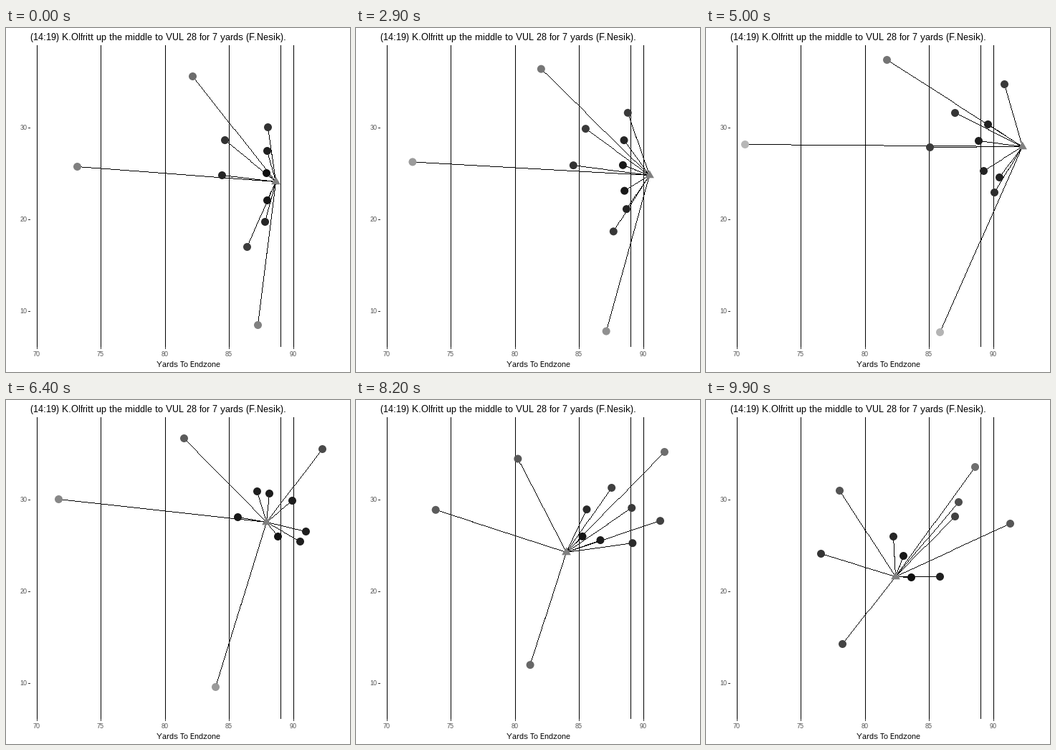
Write a matplotlib script that moves like this. It is 480 by 480 pixels and loops after 10 s.

```python
import numpy as np
import matplotlib.pyplot as plt
from matplotlib.animation import FuncAnimation
from matplotlib.patches import Polygon

SIZE, DPI, FRAMES = 480, 100, 100
PX = 72 / DPI                      # one pixel in points
YARD = np.array([17.92, 12.8])     # pixels per yard along x and y

plt.rcParams["font.family"] = "Liberation Sans"
plt.rcParams["text.hinting"] = "default"
plt.rcParams["text.hinting_factor"] = 1

# Each defender: the set, the chase, the turn back and the finish
KEYS = [13, 50, 64, 99]
DEFENCE = [
    [(260, 67), (252, 44), (248, 53), (186, 126)],
    [(99, 193), (54, 162), (73, 138), (160, 214)],
    [(351, 414), (326, 424), (292, 400), (190, 340)],
    [(305, 156), (347, 118), (350, 127), (261, 190)],
    [(301, 205), (312, 166), (323, 163), (286, 247)],
    [(365, 138), (416, 78), (441, 68), (375, 93)],
    [(364, 171), (393, 134), (399, 140), (347, 162)],
    [(363, 202), (380, 157), (367, 130), (352, 142)],
    [(364, 240), (387, 199), (379, 190), (275, 217)],
    [(361, 270), (409, 208), (418, 183), (424, 172)],
    [(336, 305), (402, 229), (410, 197), (326, 246)],
]
RUN_KEYS = [13, 29, 43, 50, 64, 82, 99]
RUNNER = [(376, 214), (409, 205), (454, 178), (441, 165), (363, 170), (293, 212), (264, 246)]


def track(points, keys):
    """Stand still until the first key, then run smoothly through the points."""
    k, p = np.array(keys, float), np.array(points) + 0.5
    m = np.gradient(p, k, axis=0, edge_order=2)
    m[0] = 0
    t = np.maximum(np.arange(FRAMES), k[0])
    i = np.clip(np.searchsorted(k, t, side="right") - 1, 0, len(k) - 2)
    h = (k[i + 1] - k[i])[:, None]
    u = (t - k[i])[:, None] / h
    return ((1 + 2 * u) * (1 - u) ** 2 * p[i] + u * (1 - u) ** 2 * h * m[i]
            + u * u * (3 - 2 * u) * p[i + 1] + u * u * (u - 1) * h * m[i + 1])


def shade(yards):
    """Grey whose perceived lightness grows with distance."""
    light = np.clip(3.45 * yards, 0, 100)
    lum = np.where(light > 8, ((light + 16) / 116) ** 3, light / 903.3)
    grey = np.where(lum > 0.0031308, 1.055 * lum ** (1 / 2.4) - 0.055, 12.92 * lum)
    return np.repeat(grey[:, None], 3, axis=1)


def hairline(ink, a, b):
    """Mark a hard one-pixel line in the alpha channel."""
    steps = int(np.abs(b - a).max()) + 1
    x, y = np.linspace(a, b, steps + 1).astype(int).T
    ink[y, x, 3] = 255


runner = track(RUNNER, RUN_KEYS)
defence = np.stack([track(p, KEYS) for p in DEFENCE], axis=1)

fig = plt.figure(figsize=(SIZE / DPI, SIZE / DPI), dpi=DPI, facecolor="white")
ax = fig.add_axes([0, 0, 1, 1])


def rule(xs, ys, color="black"):
    ax.plot(xs, ys, color=color, lw=PX, snap=False, solid_capstyle="butt", zorder=1)


def label(x, y, text, size, color="black", ha="center"):
    ax.text(x, y, text, fontsize=size * PX, color=color, ha=ha, va="baseline")


for yards in range(70, 91, 5):
    x = int(43 + (yards - 70) * YARD[0]) + 0.5
    rule([x, x], [24, 445])
    rule([x, x], [445, 448], "#333333")
    label(x - 0.5, 458, str(yards), 9, "#4d4d4d")
rule([383.5, 383.5], [24, 445])
for yards in (10, 20, 30):
    y = 523.5 - yards * YARD[1]
    rule([31, 34], [y, y], "#333333")
    label(29.5, y + 2.5, str(yards), 9, "#4d4d4d", "right")
label(254, 473, "Yards To Endzone", 11)
label(34, 17, "(14:19) K.Olfritt up the middle to VUL 28 for 7 yards (F.Nesik).",
      13, ha="left")

blank = np.zeros((SIZE, SIZE, 4), np.uint8)
links = ax.imshow(blank, extent=(0, SIZE, SIZE, 0), interpolation="nearest",
                  aspect="auto", zorder=2)
dots = ax.scatter(*defence[0].T, s=(11 * PX) ** 2, linewidths=0, snap=False, zorder=3)
corners = np.array([(0, -7.3), (6.4, 3.8), (-6.4, 3.8)])
marker = ax.add_patch(Polygon(corners, fc="#7f7f7f", lw=0, snap=False, zorder=4))
ax.set(xlim=(0, SIZE), ylim=(SIZE, 0))
ax.axis("off")


def draw(frame):
    spots, carrier = defence[frame], runner[frame]
    ink = blank.copy()
    for spot in spots:
        hairline(ink, spot, carrier)
    links.set_data(ink)
    dots.set_offsets(spots)
    dots.set_facecolor(shade(np.hypot(*((spots - carrier) / YARD).T)))
    marker.set_xy(carrier + corners)
    return links, dots, marker


anim = FuncAnimation(fig, draw, frames=FRAMES, interval=100, repeat=True, repeat_delay=0)
plt.show()
```
